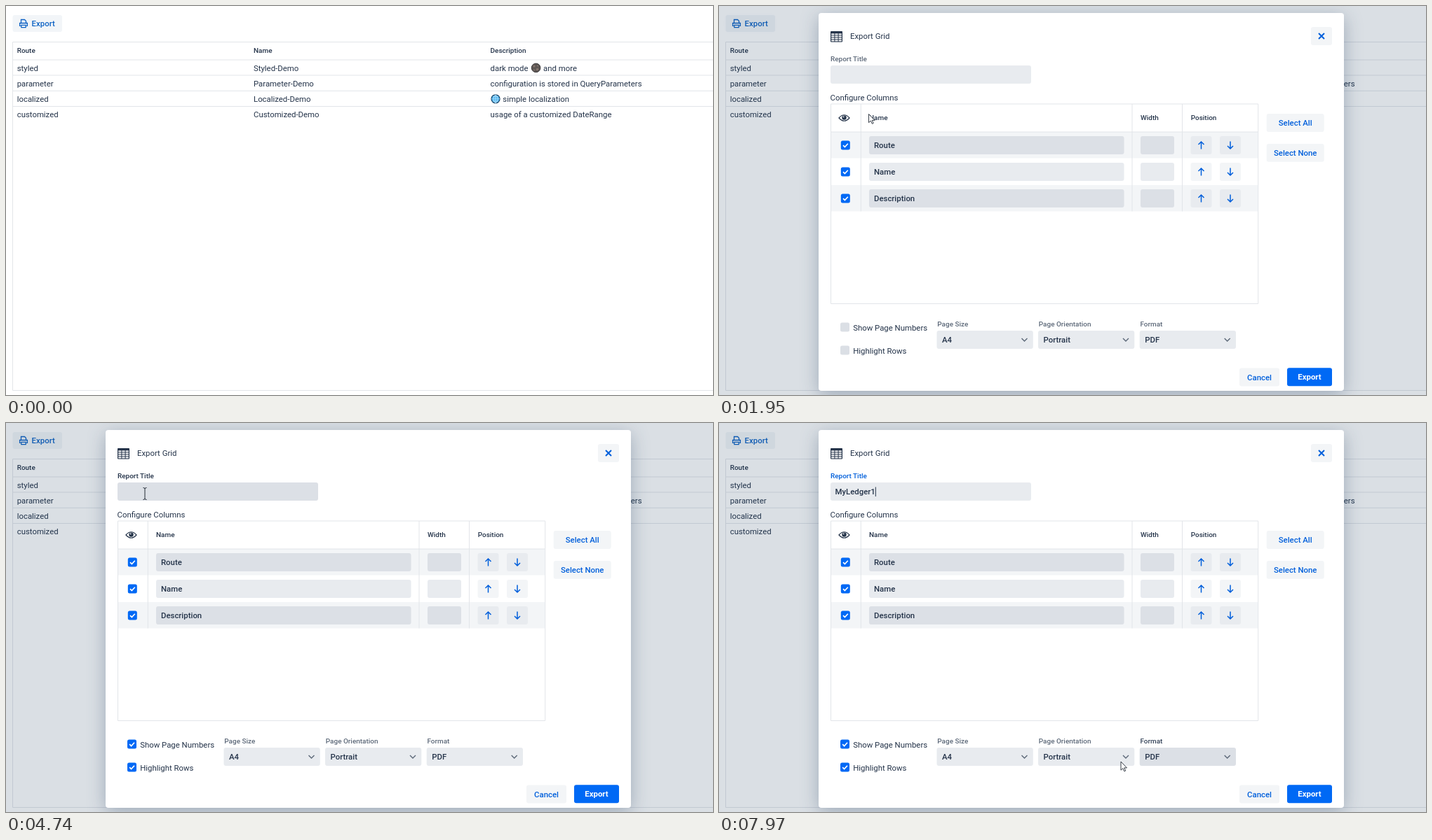
Recreate the animation shown at these times as an HTML page. Size 1008x556 px, loop 8000 ms.

```html
<!DOCTYPE html>
<html lang="en">
<head>
<meta charset="utf-8">
<title>Grid export dialog</title>
<style>
  html, body { margin: 0; width: 100%; height: 100%; overflow: hidden; background: #fff; }
  svg { display: block; width: 1008px; height: 556px; font-family: Roboto, sans-serif; }
  text { font-size: 11.38px; fill: #25344a; white-space: pre; }
  .small { font-size: 9.96px; }
  .strong { font-weight: 500; }
  .label { font-size: 9.96px; font-weight: 500; fill: #5d6979; }
  .link { font-weight: 500; fill: #005fdb; }
  .mid { text-anchor: middle; }
  .line { fill: none; stroke: #e2e5e9; }
  .icon { fill: none; stroke: #005fdb; stroke-width: 1.5; }
</style>
</head>
<body>
<svg id="stage" viewBox="0 0 1008 556"></svg>
<script>
const LOOP = 8000;
const FIELD = '#e8ebef', FIELD_DARK = '#dce0e6', BUTTON = '#f3f5f7', PRIMARY = '#0069f5';
const stage = document.getElementById('stage');

const text = (x, y, s, cls = '', id = '') =>
  `<text x="${x}" y="${y}" class="${cls}" id="${id}">${s}</text>`;
const box = (x, y, w, h, fill, id = '', r = 3) =>
  `<rect x="${x}" y="${y}" width="${w}" height="${h}" rx="${r}" fill="${fill}" id="${id}"/>`;
const path = (d, attrs) => `<path d="${d}" ${attrs}/>`;
const button = (x, y, w, h, s) =>
  box(x, y, w, h, BUTTON) + text(x + w / 2, y + h / 2 + 4, s, 'link mid');

function checkbox(x, y, id) {
  return box(x, y, 13, 13, PRIMARY, id, 2.5) +
    path(`M${x + 3.2} ${y + 6.6}l2.4 2.5 4.4-4.9`,
      `fill="none" stroke="#fff" stroke-width="1.7" id="${id}Tick"`);
}

function page() {
  const rows = [
    ['styled', 'Styled-Demo', 'dark mode'],
    ['parameter', 'Parameter-Demo', 'configuration is stored in QueryParameters'],
    ['localized', 'Localized-Demo', ''],
    ['customized', 'Customized-Demo', 'usage of a customized DateRange'],
  ];
  const cols = [15.7, 353, 690.6];
  let s = box(9.5, 13, 70.5, 24, PRIMARY, 'glow') + box(9.5, 13, 70.5, 24, '#f2f5f8', 'exportBtn');
  s += path('M21.5 24.5v-5h5l2 2v3M20.8 28.3h-1.2v-3.8h10.8v3.8h-1.2M21.8 27.3h6.4v3.4h-6.4z',
    'class="icon" style="stroke:#0d62c4;stroke-width:1.3"');
  s += text(36.6, 28.8, 'Export', 'link', 'exportText');
  s += path('M1010 51.5H9.5V549.5H1010', 'class="line"');
  s += path([77, 99, 121.3, 143.5].map(y => `M9.5 ${y}H1008`).join(''), 'class="line"');
  ['Route', 'Name', 'Description'].forEach((h, i) => s += text(cols[i], 67.3, h, 'small strong'));
  rows.forEach((row, r) => row.forEach((cell, c) => s += text(cols[c], 92.6 + r * 22.15, cell)));
  s += text(766, 92.6, 'and more') + text(708.3, 136.9, 'simple localization');

  // moon and globe
  s += '<circle cx="755.6" cy="88.4" r="6.3" fill="#5d5754" stroke="#383638"/>';
  for (const [x, y, r] of [[753, 86, 1.6], [757.5, 90.5, 1.8], [758, 85.5, 1], [753, 91.5, 1]])
    s += `<circle cx="${x}" cy="${y}" r="${r}" fill="#85766f"/>`;
  s += '<circle cx="698" cy="132.8" r="6" fill="#35a9ec" stroke="#174469" stroke-width="1.3"/>';
  s += path('M692 132.8h12M698 127v12M693.5 129.8h9M693.5 135.8h9', 'stroke="#d7f1ff" stroke-width=".7"');
  s += '<ellipse cx="698" cy="132.8" rx="3" ry="5.6" fill="none" stroke="#d7f1ff" stroke-width=".7"/>';
  return s;
}

function columnRow(name, i) {
  const y = 180 + i * 38, dark = i % 2 === 0;
  const fill = dark ? FIELD_DARK : FIELD, key = dark ? FIELD : BUTTON;
  let s = dark ? box(160, y, 608.5, 37.5, '#f3f5f7', '', 0) : '';
  s += checkbox(173.8, y + 12.5, 'col' + i);
  s += box(214, y + 6, 363.5, 26, fill) + text(221, y + 23.2, name, 'strong');
  s += box(601, y + 6, 48, 26, fill) + box(672.5, y + 6, 30, 26, key) + box(714, y + 6, 30, 26, key);
  s += path(`M687.5 ${y + 24.5}v-10.5m-4 4l4-4 4 4M729 ${y + 13.5}v10.5m-4-4l4 4 4-4`, 'class="icon"');
  return s;
}

function select(x, label, value, id) {
  return text(x + .8, 457.5, label, 'label', id + 'Label') + box(x, 464, 137.3, 26, FIELD, id) +
    text(x + 7.5, 481, value, 'strong') +
    path(`M${x + 121} 475l4 4 4-4`, 'fill="none" stroke="#5d6979" stroke-width="1.4"');
}

function dialog() {
  let s = `<g style="filter:drop-shadow(0 6px 13px rgba(28,56,90,.32))">${box(142, 10, 749, 540, '#fff', '', 4)}</g>`;
  s += box(159, 36, 17, 15.5, '#25344a', '', 1);
  for (let r = 0; r < 4; r++)
    for (let c = 0; c < 3; c++) s += box(160.2 + c * 5.2, 39.4 + r * 3, 4.2, 2, '#fff', '', 0);
  s += text(187, 47.4, 'Export Grid');
  s += box(844, 30, 30, 26, BUTTON) + path('M855 39l8 8m0-8l-8 8', 'class="icon" style="stroke-width:2"');
  s += text(159, 78.8, 'Report Title', 'label', 'titleLabel') + box(159, 85, 286, 26, FIELD, 'titleField');
  s += text(165.6, 102.4, '', 'strong', 'title') + box(0, 91.5, 1, 13.5, '#25344a', 'caret', 0);
  s += text(158.5, 134.6, 'Configure Columns');
  ['Route', 'Name', 'Description'].forEach((n, i) => s += columnRow(n, i));
  s += path('M159.5 140H768.7V425.5H159.5ZM159.5 180H768.7M202.3 140V293.5M589 140V293.5M660.5 140V293.5', 'class="line"');
  s += path('M171 160q7.5-8.5 15 0q-7.5 8.5-15 0z', 'fill="none" stroke="#25344a" stroke-width="1.2"');
  s += '<circle cx="178.5" cy="159.6" r="3.2" fill="#25344a"/><circle cx="177.6" cy="158.4" r=".9" fill="#fff"/>';
  s += text(214, 163.4, 'Name', 'small strong') + text(601, 163.4, 'Width', 'small strong') +
    text(672.7, 163.4, 'Position', 'small strong');
  s += button(780.7, 154, 82, 26, 'Select All') + button(780.7, 197, 82, 25.7, 'Select None');
  s += checkbox(173, 452.6, 'pages') + text(191.2, 463.8, 'Show Page Numbers');
  s += checkbox(173, 485.5, 'stripes') + text(191.2, 496.8, 'Highlight Rows');
  s += select(310.5, 'Page Size', 'A4', 'size') + select(455, 'Page Orientation', 'Portrait', 'turn') +
    select(599.7, 'Format', 'PDF', 'format');
  s += button(742, 517.5, 57, 26, 'Cancel') + box(810, 517.2, 64, 26, PRIMARY) +
    '<text x="842" y="534.4" class="mid" style="fill:#fff;font-weight:600">Export</text>';
  return s;
}

stage.innerHTML = page() +
  '<rect id="shade" width="1008" height="556" fill="hsla(214,53%,23%,.16)"/>' +
  `<g id="dialog">${dialog()}</g>` +
  '<circle id="click" r="8" fill="#f7ee3c" opacity=".85"/>' +
  path('M0 0V12.2L2.8 9.6 4.9 13.9 6.7 13 4.7 8.9H8.5Z', 'id="arrow" fill="#fff" stroke="#222a35" stroke-width=".9"') +
  path('M-2.5-7.5Q0-7.5 0-6Q0-7.5 2.5-7.5M0-6V8M-2.5 9.5Q0 9.5 0 8Q0 9.5 2.5 9.5', 'id="beam" fill="none" stroke="#222a35"');

const ui = {};
stage.querySelectorAll('[id]').forEach(n => { if (n.id) ui[n.id] = n; });

// keys: [time, value, value, ...]
function track(keys, t) {
  if (t <= keys[0][0]) return keys[0].slice(1);
  for (let i = 1; i < keys.length; i++) {
    const a = keys[i - 1], b = keys[i];
    if (t < b[0]) return a.slice(1).map((v, j) => v + (b[j + 1] - v) * (t - a[0]) / (b[0] - a[0]));
  }
  return keys[keys.length - 1].slice(1);
}

const pointer = [
  [190, 346, 362], [980, 88, 26], [1250, 61, 25], [1830, 61, 25], [1950, 213, 154],
  [2015, 246, 185], [2080, 275, 213], [2150, 300, 245], [2320, 300, 318], [2450, 294, 338],
  [2700, 292, 338], [3300, 225, 455], [3450, 222, 461], [3650, 222, 461], [3920, 237, 496],
  [4130, 237, 496], [4350, 233, 143], [4520, 198, 100], [5300, 198, 100],
  [7340, 770, 508], [7500, 722, 491], [7970, 573, 484],
];
// shade opacity, dialog opacity, dialog scale
const opening = [[1390, 0, 0, .95], [1440, .52, .13, .96], [1505, .9, .72, .988], [1590, 1, 1, 1]];
const typed = 'MyLedger1';
const keyTimes = [5260, 5480, 6010, 6070, 6260, 6350, 6460, 6590, 6870];

const within = (t, a, b) => t >= a && t < b;
const show = (node, on) => node.setAttribute('visibility', on ? 'visible' : 'hidden');
const fill = (node, color) => { node.style.fill = color; };

function setCheck(id, on, hover) {
  fill(ui[id], on ? PRIMARY : hover ? '#c3c8d0' : '#dbdfe5');
  ui[id + 'Tick'].setAttribute('opacity', on ? 1 : 0);
}

function draw(t) {
  const hover = track([[1040, 0], [1200, 1], [1830, 1], [1960, 0]], t)[0];
  fill(ui.exportBtn, `rgb(${242 - 14 * hover},${245 - 9 * hover},${248 - 3 * hover})`);
  fill(ui.exportText, '#0d62c4');
  ui.glow.style.cssText = `filter:blur(5px);opacity:${.16 * hover}`;

  const [shade, alpha, scale] = track(opening, t);
  ui.shade.setAttribute('opacity', shade);
  ui.dialog.setAttribute('opacity', alpha);
  ui.dialog.setAttribute('transform', `translate(516.5 280) scale(${scale}) translate(-516.5 -280)`);
  ui.dialog.style.display = alpha ? '' : 'none';

  setCheck('pages', t >= 3450, within(t, 3250, 3450));
  setCheck('stripes', t >= 4050, within(t, 3850, 4050));

  const focus = t >= 4800;
  fill(ui.titleLabel, focus ? '#005fdb' : t >= 4440 ? '#25344a' : '');
  fill(ui.titleField, within(t, 4440, 4800) ? FIELD_DARK : FIELD);
  ui.title.textContent = typed.slice(0, keyTimes.filter(k => t >= k).length);
  const end = ui.title.textContent ? ui.title.getComputedTextLength() : 0;
  ui.caret.setAttribute('x', 165.6 + end);
  ui.caret.setAttribute('opacity', focus && !within(t, 5785, 6010) && !within(t, 7400, 7930) ? 1 : 0);

  const onFormat = t >= 7480;
  fill(ui.format, onFormat ? FIELD_DARK : FIELD);
  fill(ui.formatLabel, onFormat ? '#35445a' : '');

  const [x, y] = track(pointer, t);
  const beam = within(t, 4480, 5300);
  const place = `translate(${x} ${y})`;
  for (const n of [ui.arrow, ui.beam, ui.click]) n.setAttribute('transform', place);
  show(ui.beam, beam);
  show(ui.arrow, !beam && (within(t, 190, 5300) || t >= 7340));
  show(ui.click, within(t, 3400, 3520) || within(t, 3950, 4080) || within(t, 4750, 4870));
}

const start = performance.now();
function frame() {
  draw((performance.now() - start) % LOOP);
  requestAnimationFrame(frame);
}
frame();
</script>
</body>
</html>
```
